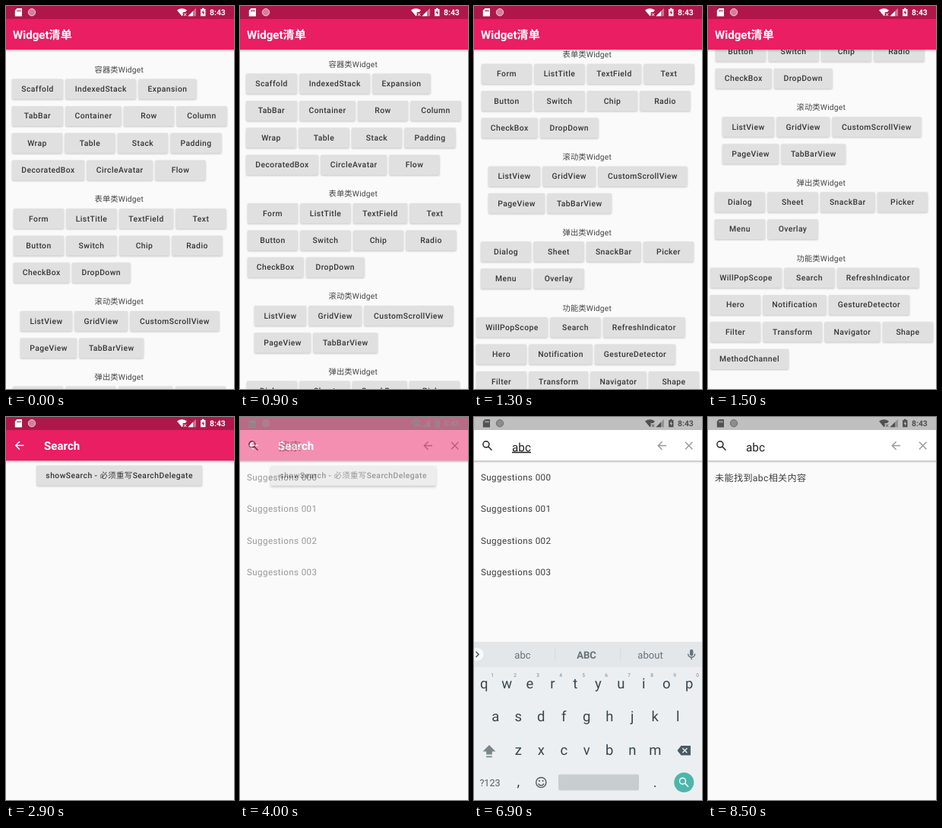
Animation of 300x501 px, one loop 9.8 s. Source, as an HTML page:

```html
<!DOCTYPE html>
<html lang="zh">
<head>
<meta charset="utf-8">
<title>Widget清单</title>
<style>
html, body { margin: 0; width: 100%; height: 100%; overflow: hidden; background: #fafafa; }
svg { display: block; width: 100vw; height: 100vh; font-family: Roboto, "Noto Sans CJK SC", "Noto Sans CJK", sans-serif; }
text { white-space: pre; text-rendering: geometricPrecision; }
.mid { text-anchor: middle; }
.btn { fill: #e0e0e0; filter: drop-shadow(0 1px .8px rgba(0,0,0,.22)); }
.btn.down { filter: drop-shadow(0 2px 1.6px rgba(0,0,0,.36)); }
.cap { font-size: 10.4px; font-weight: 500; letter-spacing: .42px; fill: #363636; }
.label { font-size: 10.3px; letter-spacing: .18px; fill: #444; }
.title { font-size: 15.1px; font-weight: 700; fill: #fff; }
.query { font-size: 15.3px; fill: #212121; }
.typing { text-decoration: underline; text-underline-offset: 2px; text-decoration-thickness: 1px; }
.item { font-size: 11.67px; letter-spacing: .365px; fill: #3c3c3c; }
.bar { filter: drop-shadow(0 1px 1.5px rgba(0,0,0,.35)); }
.line { fill: none; stroke-width: 1.45; }
.key { font-size: 18.5px; fill: #37474f; }
.digit { font-size: 6.6px; fill: #78868d; }
.hint { font-size: 13.1px; fill: #65727a; }
</style>
</head>
<body>
<svg id="stage" viewBox="0 0 300 501"></svg>
<script>
const LOOP = 9800, STEP = 100;
const stage = document.getElementById('stage');

// Each row: left edge, then labels; a label's width is 66 unless given.
const sections = [
  [83, '容器类', 8, ['Scaffold:67 IndexedStack:92.5 Expansion:76', 'TabBar:67 Container:73 Row Column',
    'Wrap Table Stack Padding:67', 'DecoratedBox:95 CircleAvatar:86.5 Flow']],
  [252.5, '表单类', 10, ['Form ListTitle TextField:71 Text', 'Button Switch Chip Radio', 'CheckBox:73.5 DropDown:76.5']],
  [386.5, '滚动类', 19, ['ListView:68 GridView:69.5 CustomScrollView:117', 'PageView:74 TabBarView:84.5']],
  [485, '弹出类', 9, ['Dialog Sheet SnackBar:71.5 Picker', 'Menu Overlay']],
  [584, '功能类', 3, ['WillPopScope:94 Search RefreshIndicator:107.5', 'Hero Notification:83 GestureDetector:106',
    'Filter Transform:77.5 Navigator:73 Shape', 'MethodChannel:103']]
];

const text = (x, y, s, cls, more = '') => `<text x="${x}" y="${y}" class="${cls}" ${more}>${s}</text>`;
const rect = (x, y, w, h, more) => `<rect x="${x}" y="${y}" width="${w}" height="${h}" ${more}/>`;
const group = (id, body) => `<g id="${id}">${body}</g>`;

function button(x, cy, w, label, id) {
  return rect(x, cy - 13.1, w, 26.2, `rx="1.4" class="btn" id="${id}"`) +
    text(x + w / 2, cy + 3.4, label, 'cap mid');
}

function section([y, name, left, rows]) {
  let out = text(148.7, y + 3.9, name + 'Widget', 'label mid');
  rows.forEach((row, i) => {
    let x = left;
    for (const part of row.split(' ')) {
      const [label, w = 66] = part.split(':');
      out += button(x, y + 25.6 + 35.4 * i, +w, label, 'b' + label);
      x += +w + 3.5;
    }
  });
  return out;
}

const backArrow = (x, y, color) =>
  `<path class="line" stroke="${color}" d="M${x + 5.8} ${y}h-10.8m5.3 -5.3l-5.3 5.3l5.3 5.3"/>`;
const cross = (x, y, color) =>
  `<path class="line" stroke="${color}" d="M${x - 4.7} ${y - 4.7}l9.4 9.4m0 -9.4l-9.4 9.4"/>`;
const lens = (x, y, color) =>
  `<g class="line" stroke="${color}"><circle cx="${x - 1.8}" cy="${y - 1.8}" r="4"/><path d="M${x + 1.1} ${y + 1.1}l4.7 4.7"/></g>`;

function statusIcons(id, color) {
  return `<g id="${id}" fill="${color}">
    <path fill-rule="evenodd" d="M14.5 3h6.5v10.5h-9.2v-7.8zM14.6 5v2.4h1v-2.4zm1.9 0v2.4h1v-2.4zm1.9 0v2.4h1v-2.4z"/>
    <circle cx="34" cy="8.2" r="4.7" fill-opacity=".45" stroke="${color}" stroke-opacity=".65" stroke-width="1"/>
    <path d="M225 5.6Q231.5 .9 238 5.6L235.9 8.1H232.7V12L231.5 13.3z"/>
    <path d="M234 9.4l3.2 3.6m0 -3.6l-3.2 3.6" stroke="${color}" stroke-width="1"/>
    <path d="M239.5 13.3L250 2.8V13.3z" fill-opacity=".4"/><path d="M239.5 13.3L246 6.8V13.3z"/>
    <path fill-rule="evenodd" d="M258 2.8h2.6v1.1h1.9v9.4h-6.4v-9.4h1.9zM259.8 5.2l-2.2 3.8h1.4v2.8l2.1 -3.9h-1.3z"/>
    ${text(268, 12.2, '8:43', '', 'font-size="10.4" font-weight="600"')}</g>`;
}

function keyboard() {
  let out = rect(0, 294, 300, 34, 'fill="#e3e7ea"') + rect(0, 327, 300, 240, 'fill="#eceff1"');
  out += rect(106.5, 302, .7, 17, 'fill="#d0d6d9"') + rect(192.5, 302, .7, 17, 'fill="#d0d6d9"');
  out += '<circle cx="4" cy="310.5" r="8.5" fill="#f8fafa"/><path class="line" stroke="#455a64" d="M2.5 307l3.6 3.6l-3.6 3.6"/>';
  out += [64, 148, 232].map((x, i) => text(x, 316.2, '', 'hint mid', `id="word${i}"`)).join('');
  out += '<g fill="#65727a"><rect x="284" y="304" width="4.4" height="8.4" rx="2.2"/></g>' +
    '<path class="line" stroke="#65727a" d="M281.7 309.8a4.5 4.5 0 0 0 9 0M286.2 314.3v3"/>';
  [['qwertyuiop', 13.3, 355], ['asdfghjkl', 28.3, 397.5], ['zxcvbnm', 58.3, 442]].forEach(([keys, x0, y], row) => {
    [...keys].forEach((k, i) => {
      const x = x0 + 30 * i;
      out += text(x, y, k, 'key mid');
      if (!row) out += text(x + 10.7, 340, (i + 1) % 10, 'digit mid');
    });
  });
  out += '<path fill="#78868d" d="M20 429l-8.4 8.4h4.6v4h7.6v-4h4.6zM16.2 443.6h7.6v1.6h-7.6z"/>';
  out += '<path fill="#455a64" d="M272.5 430h12.5v12.4h-12.5l-5 -6.2z"/>' +
    '<path d="M274.4 433.2l6 6m0 -6l-6 6" stroke="#eceff1" stroke-width="1.4"/>';
  out += text(21, 482.5, '?123', 'mid', 'font-size="12.6" fill="#546067"');
  out += text(58.3, 482.5, ',', 'key mid') + text(238.3, 483.5, '.', 'key mid');
  out += '<g class="line" stroke="#546067"><circle cx="88.3" cy="478" r="6.6"/><path d="M84.8 479.6a3.7 3.7 0 0 0 7 0"/></g>' +
    '<g fill="#546067"><circle cx="86" cy="476" r="1.1"/><circle cx="90.6" cy="476" r="1.1"/></g>';
  out += rect(111, 467.5, 106, 21, 'rx="2" fill="#c8cdd0"');
  out += '<circle cx="276.3" cy="478" r="13" fill="#4db6ac"/>' + lens(276.3, 478, '#fff');
  return out;
}

const appBar = (color) => rect(-4, -10, 308, 67, `fill="${color}" class="bar"`);
const page = rect(0, 0, 300, 501, 'fill="#fafafa"');

stage.innerHTML =
  page +
  group('list', sections.map(section).join('')) +
  appBar('#e91e63') + text(9, 43.3, 'Widget清单', 'title') +
  group('demo', page + button(40.3, 76.6, 217.7, 'showSearch - 必须重写SearchDelegate', 'open') +
    appBar('#e91e63') + backArrow(17.7, 37.3, '#fff') + text(50, 42.5, 'Search', 'title')) +
  group('finder', page +
    group('tips', [0, 1, 2, 3].map(i => text(9, 83 + 41.3 * i, 'Suggestions 00' + i, 'item')).join('')) +
    text(9, 84, '未能找到abc相关内容', 'item', 'id="result" style="font-size:12.1px"') +
    appBar('#fff') + lens(17.7, 37.6, '#212121') + backArrow(247.3, 37.5, '#999') + cross(282.7, 37.5, '#999') +
    text(50.3, 43.5, '搜索', 'query', 'id="empty" style="fill:#8e8e8e"') +
    text(50, 44.6, '', 'query', 'id="typed"') +
    rect(0, 32, 1.5, 16, 'fill="#4285f4" id="cursor"')) +
  group('keys', keyboard()) +
  rect(0, 0, 300, 17, 'fill="#000" fill-opacity=".25"') +
  statusIcons('light', '#fff') + statusIcons('dark', '#505050');

const el = {};
stage.querySelectorAll('[id]').forEach(n => el[n.id] = n);

const clamp = v => Math.max(0, Math.min(1, v));
const span = (t, a, b) => clamp((t - a) / (b - a));
const smooth = k => k * k * (3 - 2 * k);
const fade = (n, v) => { n.setAttribute('opacity', v); n.style.display = v > 0 ? '' : 'none'; };
const shift = (n, y) => n.setAttribute('transform', `translate(0 ${y.toFixed(2)})`);
const within = (t, a, b) => t >= a && t < b;

function draw(ms) {
  const t = Math.floor(ms / STEP) * STEP;

  shift(el.list, -254 * smooth(Math.pow(span(t, 800, 1500), 1.19)));
  el.bSearch.classList.toggle('down', t >= 2600);
  el.open.classList.toggle('down', t >= 3700);

  const enter = t < 2800 ? 0 : t < 2900 ? .6 : 1;
  fade(el.demo, enter);
  shift(el.demo, 50 * (1 - enter));

  const search = smooth(span(t, 3700, 4300));
  fade(el.finder, search);
  fade(el.light, 1 - search);
  fade(el.dark, search);

  const found = span(t, 7900, 8300);
  fade(el.tips, 1 - found);
  fade(el.result, found);

  const count = t < 6200 ? 0 : Math.min(3, (t - 6100) / STEP);
  el.typed.textContent = 'abc'.slice(0, count);
  el.typed.classList.toggle('typing', t < 8000);
  fade(el.empty, count ? 0 : 1);
  const lit = within(t, 4900, 5500) || within(t, 5900, 6900) || within(t, 7400, 7800);
  fade(el.cursor, lit ? 1 : 0);
  el.cursor.setAttribute('x', 50.2 + 8.4 * count);

  const rise = 1 - span(t, 4900, 5200), drop = span(t, 7900, 8500);
  shift(el.keys, 52 * (Math.pow(rise, 2.2) + drop * drop));
  fade(el.keys, t < 4900 ? 0 : (1 - .45 * rise * rise) * (1 - drop));
  const words = t < 6500 ? ['thanks', 'I', 'we'] : ['abc', 'ABC', 'about'];
  words.forEach((w, i) => el['word' + i].textContent = w);
  el.word1.style.fontWeight = t < 6500 ? 400 : 700;
}

const start = performance.now();
function tick() {
  draw((performance.now() - start) % LOOP);
  requestAnimationFrame(tick);
}
draw(0);
tick();
</script>
</body>
</html>
```
